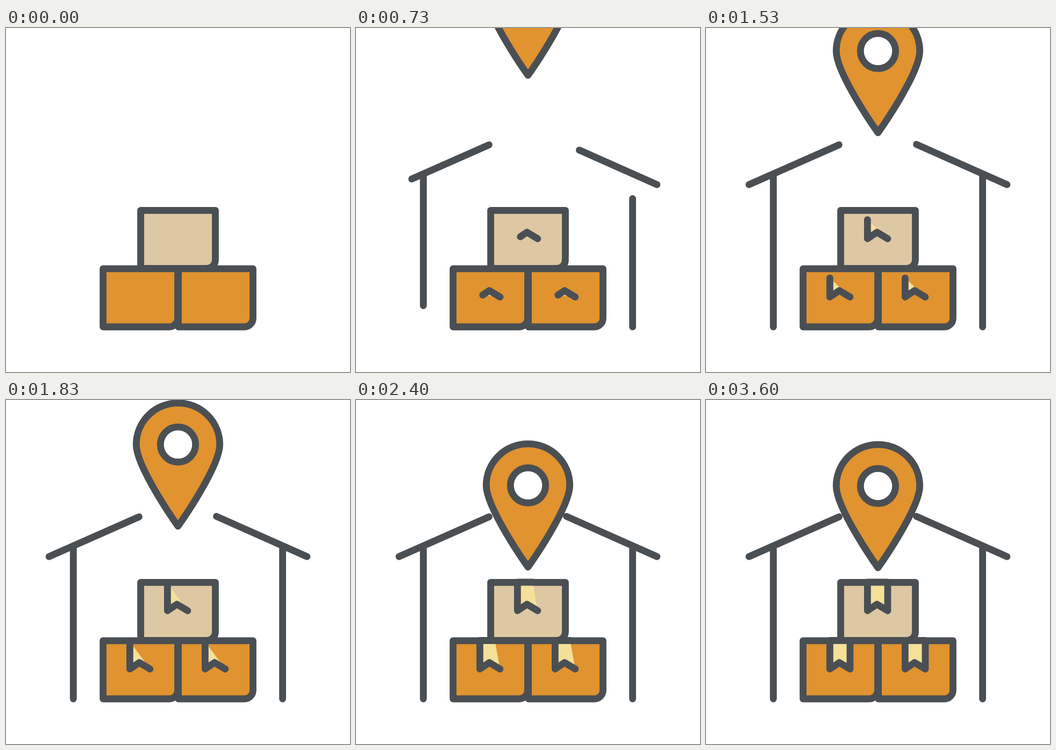
These frames come from a looping animation (640x640 px, 4.81 s). An HTML page with a canvas:

```html
<!DOCTYPE html>
<html lang="en">
<head>
<meta charset="utf-8">
<title>Warehouse pin</title>
<style>
  html, body { margin: 0; height: 100%; overflow: hidden; background: #fff; }
  canvas { display: block; width: 100vw; height: 100vh; }
</style>
</head>
<body>
<canvas id="stage" width="640" height="640"></canvas>
<script>
const ctx = document.getElementById('stage').getContext('2d');
const LOOP = 4810, FIRST = 30;
const WALL_TIME = 852, PIN_TIME = 2400, TAPE_TIME = 3600;
const DARK = '#4a4f54', ORANGE = '#e0932f', TAN = '#dec7a3', YELLOW = '#f4e098';

const LINES = [
  [[247.5, 217.3], [80, 291.3]],
  [[560, 291.3], [391.5, 216.5]],
  [[125.3, 278], [125.3, 556]],
  [[514.6, 556], [514.6, 278]]
];
const TAPE = [[338, 392], [318, 380], [300.4, 392], [300.4, 339], [338, 339], [338, 392]];
const BOXES = [[0, 0, TAN], [-70, 108.5, ORANGE], [70, 108.5, ORANGE]];
const PIN = new Path2D('M320 312C320 312 242.3 203 242.3 160A77.7 77.2 0 0 1 397.7 160C397.7 203 320 312 320 312Z');
const HOLE = new Path2D('M287.3 160a32.7 32.7 0 1 0 65.4 0a32.7 32.7 0 1 0 -65.4 0Z');
const BOX = new Path2D('M250.6 339.3H389.5V431.5A16 16 0 0 1 373.5 447.5H250.6Z');

const clamp = v => Math.min(1, Math.max(0, v));

function shape(path, fill) {
  ctx.fillStyle = fill;
  ctx.fill(path);
  ctx.stroke(path);
}

// The first part p (0..1) of a polyline, measured by length
function part(points, p) {
  const lengths = points.slice(1).map(([x, y], i) => Math.hypot(x - points[i][0], y - points[i][1]));
  let left = p * lengths.reduce((a, b) => a + b, 0);
  const path = new Path2D();
  path.moveTo(...points[0]);
  for (let i = 0; i < lengths.length && left > 0; i++) {
    const k = Math.min(1, left / lengths[i]);
    const [x0, y0] = points[i], [x1, y1] = points[i + 1];
    path.lineTo(x0 + (x1 - x0) * k, y0 + (y1 - y0) * k);
    left -= lengths[i];
  }
  return path;
}

function draw(t) {
  ctx.clearRect(0, 0, 640, 640);
  ctx.lineWidth = 12.8;
  ctx.lineCap = ctx.lineJoin = 'round';
  ctx.strokeStyle = DARK;
  const started = t >= FIRST;

  if (started) {
    for (const line of LINES) ctx.stroke(part(line, clamp(t / WALL_TIME)));
  }
  const tape = part(TAPE, clamp(t / TAPE_TIME));
  for (const [x, y, fill] of BOXES) {
    ctx.save();
    ctx.translate(x, y);
    shape(BOX, fill);
    if (started) shape(tape, YELLOW);
    ctx.restore();
  }
  ctx.save();
  ctx.translate(0, 320 * (clamp((t - 10) / PIN_TIME) - 1));
  shape(PIN, ORANGE);
  shape(HOLE, '#fff');
  ctx.restore();
}

const start = performance.now();
function frame() {
  draw((performance.now() - start) % LOOP);
  requestAnimationFrame(frame);
}
frame();
</script>
</body>
</html>
```
